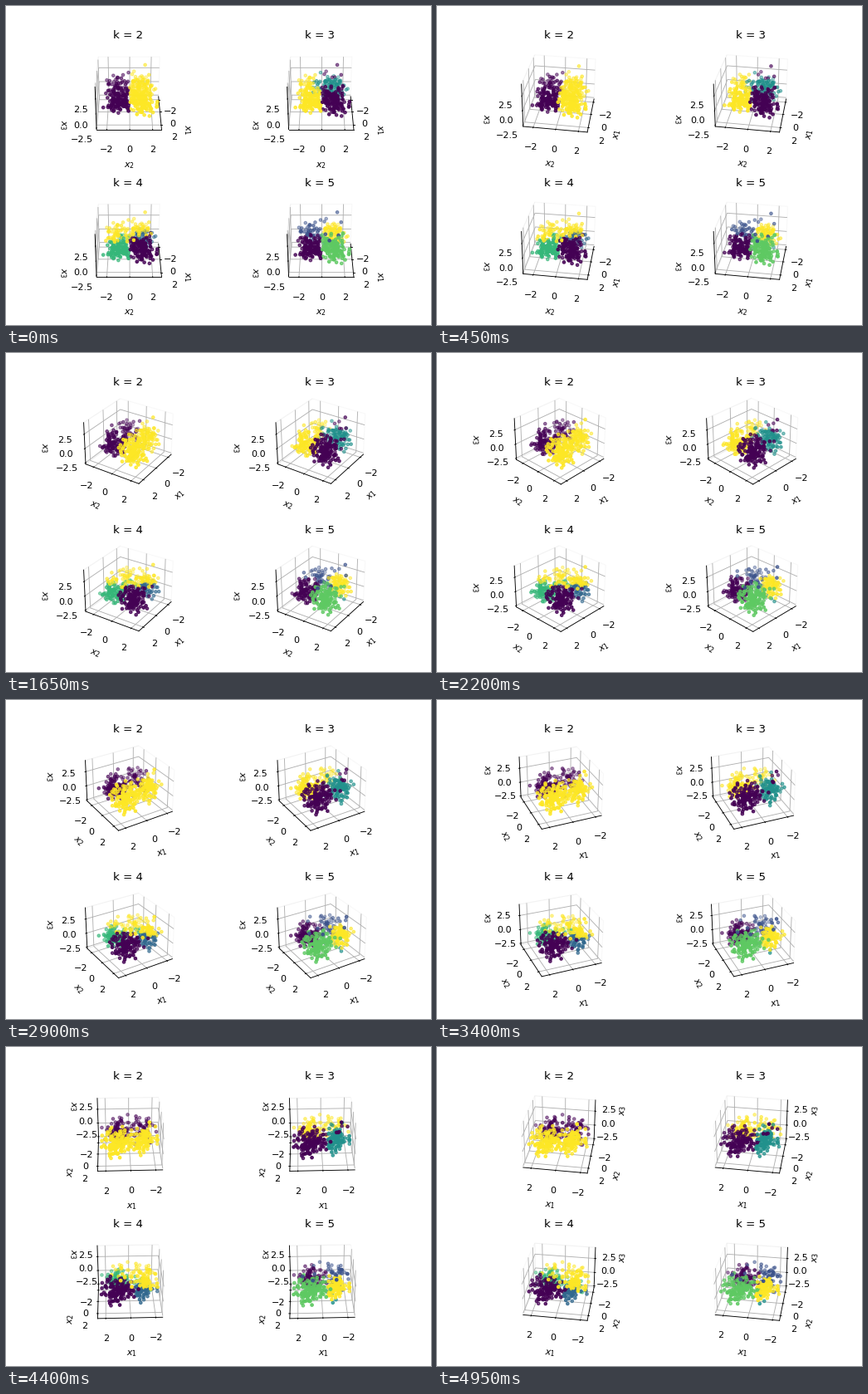
Animation, 512 px wide and 384 px high, one loop 5000 ms. Source, as a matplotlib script:

```python
import numpy as np
import matplotlib.pyplot as plt
from matplotlib.animation import FuncAnimation

FRAMES, STEP_MS = 100, 50
POINTS = 400
rng = np.random.default_rng(7)


def make_cloud():
    """Soft blobs at the corners of a square, plus one high outlier."""
    side_y = rng.choice([-1, 1], POINTS, p=[0.42, 0.58])
    front = np.where(side_y > 0, 0.55, 0.64)
    side_x = np.where(rng.random(POINTS) < front, 1, -1)
    x = side_x + rng.normal(0, 0.55, POINTS)
    y = side_y + rng.normal(0, 0.52, POINTS)
    z = 0.5 - 0.2 * side_x + rng.normal(0, 0.9, POINTS)
    cloud = np.clip([x, y, z], [[-2.25], [-2.5], [-2.3]], [[2.3], [2.4], [3]])
    return np.append(cloud, [[-1.5], [1.4], [4]], axis=1)


def split(cloud):
    """Cluster labels for each k, cut along slightly blurred borders."""
    x, y, z = cloud + rng.normal(0, 0.15, cloud.shape)
    right = cloud[1] > 0
    back = x < -0.5
    high = z - 0.5 * x - 0.3 * y > 1.2
    low = right & (z < -0.7) & (x < 0.3)
    return {
        2: np.where(right, 1, 0),
        3: np.select([right & (~back | (z > 2)), back & (y > -0.8)],
                     [0, 1], 2),
        4: np.select([high, right & ~back, right], [3, 0, 1], 2),
        5: np.select([(z > 2.2) | (~right & back), low, right & ~back, right],
                     [1, 2, 3, 4], 0),
    }


cloud = make_cloud()
fig = plt.figure(figsize=(6.4, 4.8), dpi=80)
fig.subplots_adjust(wspace=0.4, hspace=0.5)
axes = []
for spot, (k, labels) in enumerate(split(cloud).items(), start=1):
    ax = fig.add_subplot(2, 2, spot, projection="3d")
    ax.scatter(*cloud, c=labels, cmap="viridis", s=10)
    ax.set(title=f"k = {k}", xlabel="$x_1$", ylabel="$x_2$", zlabel="$x_3$",
           xlim=(-2.55, 2.65), ylim=(-2.9, 2.78), zlim=(-2.77, 4.43),
           xticks=(-2, 0, 2), yticks=(-2, 0, 2), zticks=(-2.5, 0, 2.5))
    for axis in (ax.xaxis, ax.yaxis, ax.zaxis):
        axis.pane.fill = False
    axes.append(ax)


def draw(i):
    for ax in axes:
        ax.view_init(elev=30, azim=i)
    return axes


anim = FuncAnimation(fig, draw, frames=FRAMES, interval=STEP_MS, repeat=True)
plt.show()
```
